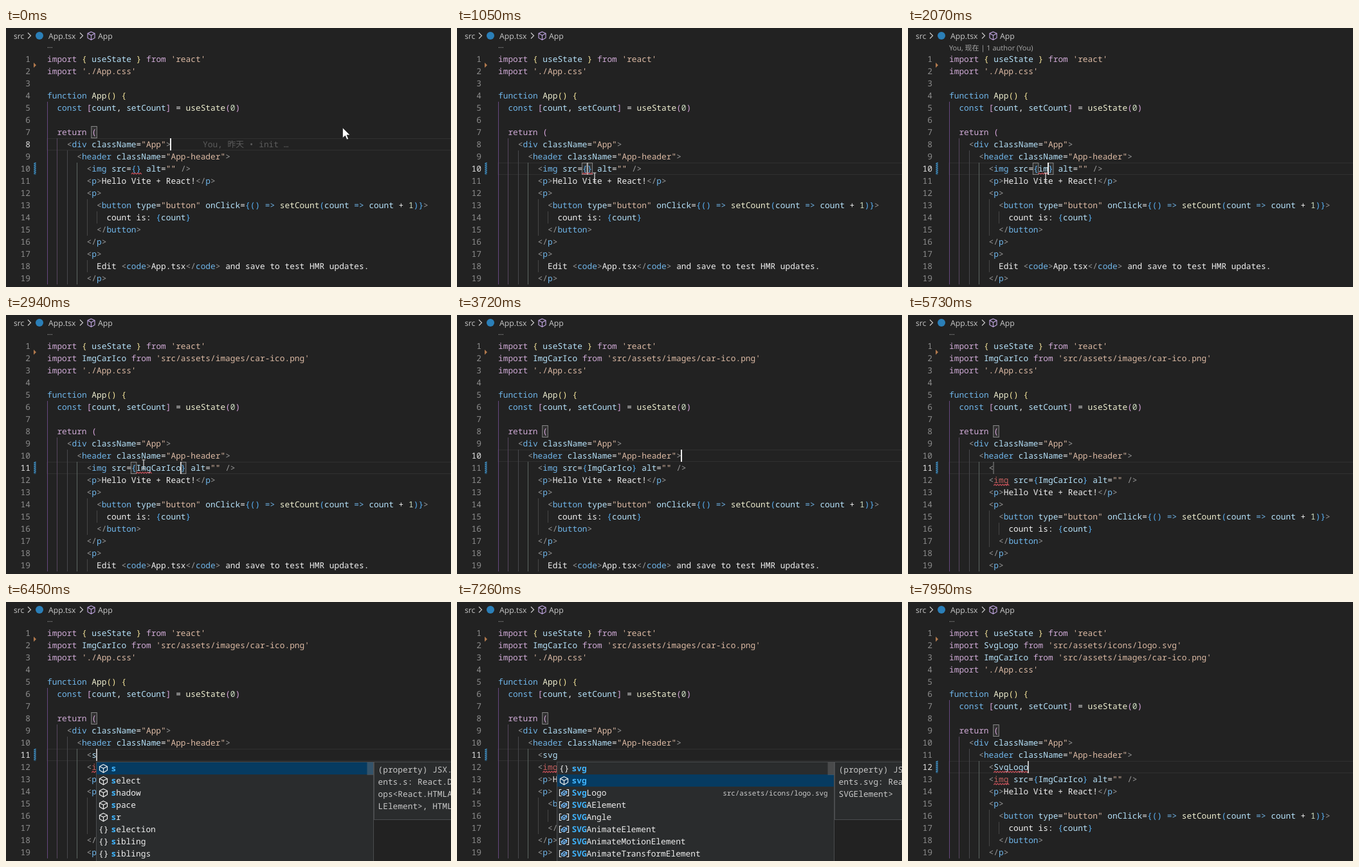
An HTML page for the animation above (8000 ms loop, 692x404 px).

```html
<!DOCTYPE html>
<html lang="en">
<head>
<meta charset="utf-8">
<title>Auto import in the editor</title>
<style>
html, body { margin: 0; width: 100%; height: 100%; overflow: hidden; background: #222; }
svg { display: block; width: 692px; height: 404px; }
text { white-space: pre; text-rendering: geometricPrecision;
  font: 500 12.83px "Noto Sans Mono", "Noto Sans CJK SC", "Noto Sans CJK", monospace; }
.ui { font: 12.2px "Open Sans", "Noto Sans", sans-serif; fill: #c8c8c8; }
.lens { font: 11px "Open Sans", "Noto Sans CJK SC", "Noto Sans CJK", sans-serif; fill: #aaa; }
.ghost { font-style: italic; fill: #6c6474; }
.blame { fill: #5c5c5c; font-weight: 400; }
.path { font-size: 10.9px; fill: #ccc; }
.line { fill: none; stroke-width: 1.2; }
.hit { font-weight: 700; fill: #3fb4ff; }
</style>
</head>
<body>
<svg viewBox="0 0 692 404">
  <rect width="692" height="404" fill="#222"/>
  <text class="ui" x="12" y="17">src</text>
  <path class="line" stroke="#c8c8c8" d="M34 7.500l4.500 4.500-4.500 4.500M115 7.500l4.500 4.500-4.500 4.500"/>
  <circle cx="52" cy="12" r="6" fill="#2b7fb8"/>
  <text class="ui" x="66" y="17">App.tsx</text>
  <path class="line" stroke="#b9a0d8" d="M132.500 6l5.500 2.500v7l-5.500 3-5.500-3v-7zM127 8.500l5.500 3 5.500-3M132.500 11.500v7"/>
  <text class="ui" x="143" y="17">App</text>
  <g id="view"></g>
  <rect id="caret" width="2" height="19" fill="#eee"/>
  <g id="over"></g>
  <path id="arrow" d="M0 0v16l4-3.500 2.500 6 2.500-1-2.500-6h5z" fill="#fff" stroke="#222" stroke-width=".7"/>
  <path id="beam" class="line" stroke="#ddd" d="M-2.500-7h5M0-7v14M-2.500 7h5"/>
</svg>
<script>
const LOOP = 8000, CW = 7.698, ROW = 19, LEFT = 64;
const $ = id => document.getElementById(id);
const colX = c => LEFT + c * CW;
const lineY = n => 39 + (n - 1) * ROW;
const clamp = v => Math.max(0, Math.min(1, v));
const esc = s => s.replace(/&/g, '&amp;').replace(/</g, '&lt;');

// ~x switches the ink for what follows
const ink = {
  k: '#cfaad6', y: '#f4e49a', v: '#b6e2fa', s: '#dcbaa4', d: '#70b6ea', f: '#eeeed0',
  o: '#d8a6dc', n: '#d0e0c4', g: '#9a9a9a', w: '#f0f0f0', u: '#58b0f4', r: '#c2605f'
};
const paint = s => s.split('~').slice(1)
  .map(p => `<tspan fill="${ink[p[0]]}">${esc(p.slice(1))}</tspan>`).join('');
const text = (x, y, body, attrs = '') => `<text x="${x}" y="${y}" ${attrs}>${body}</text>`;
const rect = (x, y, w, h, attrs) => `<rect x="${x}" y="${y}" width="${w}" height="${h}" ${attrs}/>`;

const importLine = (name, path) => [0, `~kimport ~v${name} ~kfrom ~s'${path}'`];

function source(s) {
  const tag = s.bad ? 'r' : 'd';
  return [
    [0, "~kimport ~y{ ~vuseState ~y} ~kfrom ~s'react'"],
    ...(s.logo ? [importLine('SvgLogo', 'src/assets/icons/logo.svg')] : []),
    ...(s.car ? [importLine('ImgCarIco', 'src/assets/images/car-ico.png')] : []),
    [0, "~kimport ~s'./App.css'"],
    [0, ''],
    [0, '~dfunction ~fApp~y() {'],
    [2, '~dconst ~o[~vcount~w, ~vsetCount~o] ~w= ~fuseState~o(~n0~o)'],
    [2, ''],
    [2, '~kreturn ~o('],
    [4, '~g<~ddiv ~vclassName~w=~s"App"~g>'],
    [6, '~g<~dheader ~vclassName~w=~s"App-header"~g>'],
    ...(s.typed != null ? [[8, s.typed]] : []),
    [8, `~g<~${tag}img ~vsrc~w=~u{~v${s.img}~u} ~valt~w=~s"" ~g/>`],
    [8, '~g<~dp~g>~wHello Vite + React!~g</~dp~g>'],
    [8, '~g<~dp~g>'],
    [10, '~g<~dbutton ~vtype~w=~s"button" ~vonClick~w=~u{() ~d=> ~fsetCount~u(~vcount ~d=> ~vcount ~w+ ~n1~u)}~g>'],
    [12, '~wcount is: ~u{~vcount~u}'],
    [10, '~g</~dbutton~g>'],
    [8, '~g</~dp~g>'],
    [8, '~g<~dp~g>'],
    [10, '~wEdit ~g<~dcode~g>~wApp.tsx~g</~dcode~g>~w and save to test HMR updates.'],
    [8, '~g</~dp~g>']
  ].slice(0, 19);
}

const guides = ['#66477f', '#56465f', '#48484c', '#5c6662', '#464646', '#464646'];

function squiggle(line, from, to) {
  let d = `M${colX(from)} ${lineY(line) + 18}`;
  for (let x = 0, up = true; x < (to - from) * CW - 1; x += 2, up = !up) d += `l2 ${up ? -2 : 2}`;
  return `<path class="line" stroke="#c9505a" d="${d}"/>`;
}

const bracket = (line, col) =>
  rect(colX(col) - .5, lineY(line) + .5, 8.5, 18, 'fill="#ffffff10" stroke="#888"');

function editor(s) {
  const [active, col] = s.at;
  const lines = source(s);
  const ret = lines.findIndex(l => l[1].startsWith('~kreturn')) + 1;
  const imgLine = lines.findIndex(l => l[1].includes('img ~v')) + 1;
  let out = s.lens
    ? text(64, 35, 'You, 现在 | 1 author (You)', 'class="lens"')
    : text(64, 31, '…', 'class="lens"');
  out += '<path d="M43 54l4 4-4 4z" fill="#b0784c"/>';
  out += rect(LEFT, lineY(active) + .5, 640, 18, 'fill="none" stroke="#303030"');

  lines.forEach(([indent, body], i) => {
    const n = i + 1, y = lineY(n);
    for (let c = 0; c < indent; c += 2)
      out += rect(Math.round(colX(c)), y, 1, ROW, `fill="${guides[c / 2]}"`);
    out += text(38, y + 14, n, `text-anchor="end" fill="${n === active ? '#e0e0e0' : '#8c8c8c'}"`);
    out += text(colX(indent), y + 14, paint(body));
  });

  const edit = s.typed != null ? imgLine - 1 : imgLine;
  out += rect(43.5, lineY(edit), 3, ROW, 'fill="#28506c"');
  for (let y = 2; y < ROW; y += 3)
    out += `<path d="M43.500 ${lineY(edit) + y}l3-2" stroke="#4796c8" stroke-width="1.300"/>`;

  if (s.inBraces) out += bracket(active, 17) + bracket(active, 18 + s.img.length);
  else out += bracket(ret, 9);
  if (s.blame) out += text(306, lineY(active) + 14, 'You, 昨天 • init …', 'class="blame"');
  if (s.ghost) out += text(colX(col), lineY(active) + 14, esc(s.ghost), 'class="ghost"');
  if (s.wave) out += squiggle(active + (s.waveRow || 0), ...s.wave);
  if (s.bad) out += squiggle(imgLine, 9, 12);
  return out;
}

const icons = {
  c: (x, y) => `<path class="line" stroke="#eee" d="M${x} ${y - 6}l6 3v6l-6 3.500-6-3.500v-6zM${x - 6} ${y - 3}l6 3 6-3M${x} ${y}v6.500"/>`,
  b: (x, y) => text(x - 7.5, y + 4, '{}', 'fill="#eee"'),
  v: (x, y) => `<path class="line" stroke="#eee" d="M${x - 4} ${y - 5}h-3v10h3M${x + 4} ${y - 5}h3v10h-3"/>` +
    `<path class="line" stroke="#75beff" d="M${x - 4} ${y}l4-3 4 1-4 3zM${x - 4} ${y}v2.500l4 1.500 4-3v-3M${x} ${y + 1}v3"/>`
};

// items: icon letter followed by the label
const lists = {
  img: {
    items: 'vImgCarIco bimg vImage vImageBitmap vImageBitmapRenderingContext vImageData vHTMLImageElement bimport'.split(' '),
    path: 'src/assets/images/car-ico.png', pathRow: 0,
    info: ['Auto import fro', "'src/assets/ima"]
  },
  s: {
    items: 'cs cselect cshadow cspace csr bselection bsibling bsiblings'.split(' '),
    info: ['(property) JSX.', 'ents.s: React.D', 'ops<React.HTMLA', 'LElement>, HTML']
  },
  svg: {
    items: 'bsvg csvg vSvgLogo vSVGAElement vSVGAngle vSVGAnimateElement vSVGAnimateMotionElement vSVGAnimateTransformElement'.split(' '),
    path: 'src/assets/icons/logo.svg', pathRow: 2,
    info: ['(property) JS', 'ents.svg: Reac', 'SVGElement>']
  }
};

function popup(s) {
  if (!s.pop) return '';
  const [name, picked, hit] = s.pop, list = lists[name];
  const x = Math.round(colX(s.at[1])) - .5, w = 431;
  const top = lineY(s.at[0] + 1) + 1.5, y = top + .5;
  const frame = 'fill="#2a2c2d" stroke="#4a4c4e"';
  let out = rect(x, top, w, 230, frame);
  out += rect(x + .5, y + picked * ROW, w - 1, ROW, 'fill="#063b61"');
  list.items.forEach((item, i) => {
    const cy = y + i * ROW + 9.5, label = item.slice(1);
    const at = Math.max(0, label.toLowerCase().indexOf(name.slice(0, hit)));
    out += icons[item[0]](x + 11, cy);
    out += text(x + 23, cy + 4.5, label.slice(0, at) +
      `<tspan class="hit">${label.slice(at, at + hit)}</tspan>` + label.slice(at + hit), 'fill="#eee"');
    if (list.path && i === list.pathRow)
      out += text(x + w - 10, cy + 4.5, list.path, 'text-anchor="end" class="path"');
  });
  out += rect(x + w - 10, y, 10, 20, 'fill="#79797966"');
  out += rect(x + w + 1, top, 300, 90, frame);
  list.info.forEach((l, i) => out += text(x + w + 7, y + 16 + i * ROW, esc(l), 'fill="#c8c8c8"'));
  return out;
}

const rest = 'img src={ImgCarIco} className="App-logo" alt="logo" />';
const steps = [
  [0, { at: [8, 25], img: '', blame: true, wave: [17, 19], waveRow: 2 }],
  [840, { at: [10, 18], blame: false, inBraces: true, waveRow: 0 }],
  [1950, { at: [10, 19], img: 'i', wave: [18, 19] }],
  [2040, { at: [10, 20], img: 'im', lens: true, wave: [18, 20] }],
  [2160, { pop: ['img', 0, 2] }],
  [2250, { at: [10, 21], img: 'img', pop: ['img', 0, 3], wave: [18, 21] }],
  [2610, { at: [10, 27], img: 'ImgCarIco', pop: null, lens: false }],
  [2790, { at: [11, 27], car: true }],
  [3000, { wave: null }],
  [3630, { at: [10, 37], inBraces: false }],
  [4530, { at: [11, 8], typed: '' }],
  [4590, { ghost: '<' + rest, wave: [0, 8] }],
  [4980, { at: [11, 9], typed: '~g<', ghost: rest, wave: null }],
  [5400, { ghost: null, bad: true }],
  [6300, { at: [11, 10], typed: '~g<~vs' }],
  [6360, { pop: ['s', 0, 1] }],
  [6600, { at: [11, 11], typed: '~g<~vsv', pop: ['svg', 1, 2] }],
  [6780, { at: [11, 12], typed: '~g<~vsvg', pop: ['svg', 1, 3] }],
  [7380, { pop: ['svg', 2, 3] }],
  [7620, { at: [11, 16], typed: '~g<~vSvgLogo', pop: null }],
  [7800, { at: [12, 16], logo: true, wave: [9, 16] }]
];

let shown = -1, moved = 0;

function show(i) {
  const past = steps.slice(0, i + 1);
  const s = Object.assign({}, ...past.map(p => p[1]));
  moved = past.filter(p => p[1].at).pop()[0];
  $('view').innerHTML = editor(s);
  $('over').innerHTML = popup(s);
  $('caret').setAttribute('x', Math.round(colX(s.at[1])) - 1);
  $('caret').setAttribute('y', lineY(s.at[0]));
  shown = i;
}

function frame() {
  const t = performance.now() % LOOP;
  const i = steps.filter(s => s[0] <= t).length - 1;
  if (i !== shown) show(i);

  // smooth blink, restarted by each edit
  const p = (t - moved) % 1000;
  $('caret').style.opacity = clamp((300 - Math.min(p, 1000 - p)) / 200);

  const u = clamp((t - 30) / 750), e = u * u * (3 - 2 * u);
  $('arrow').setAttribute('transform', `translate(${523.5 - 309.5 * e} ${155.5 + 74.5 * e})`);
  $('arrow').style.display = u < 1 ? '' : 'none';
  $('beam').setAttribute('transform', 'translate(214 233)');
  $('beam').style.display = u === 1 && t < 3630 ? '' : 'none';
  requestAnimationFrame(frame);
}
frame();
</script>
</body>
</html>
```
